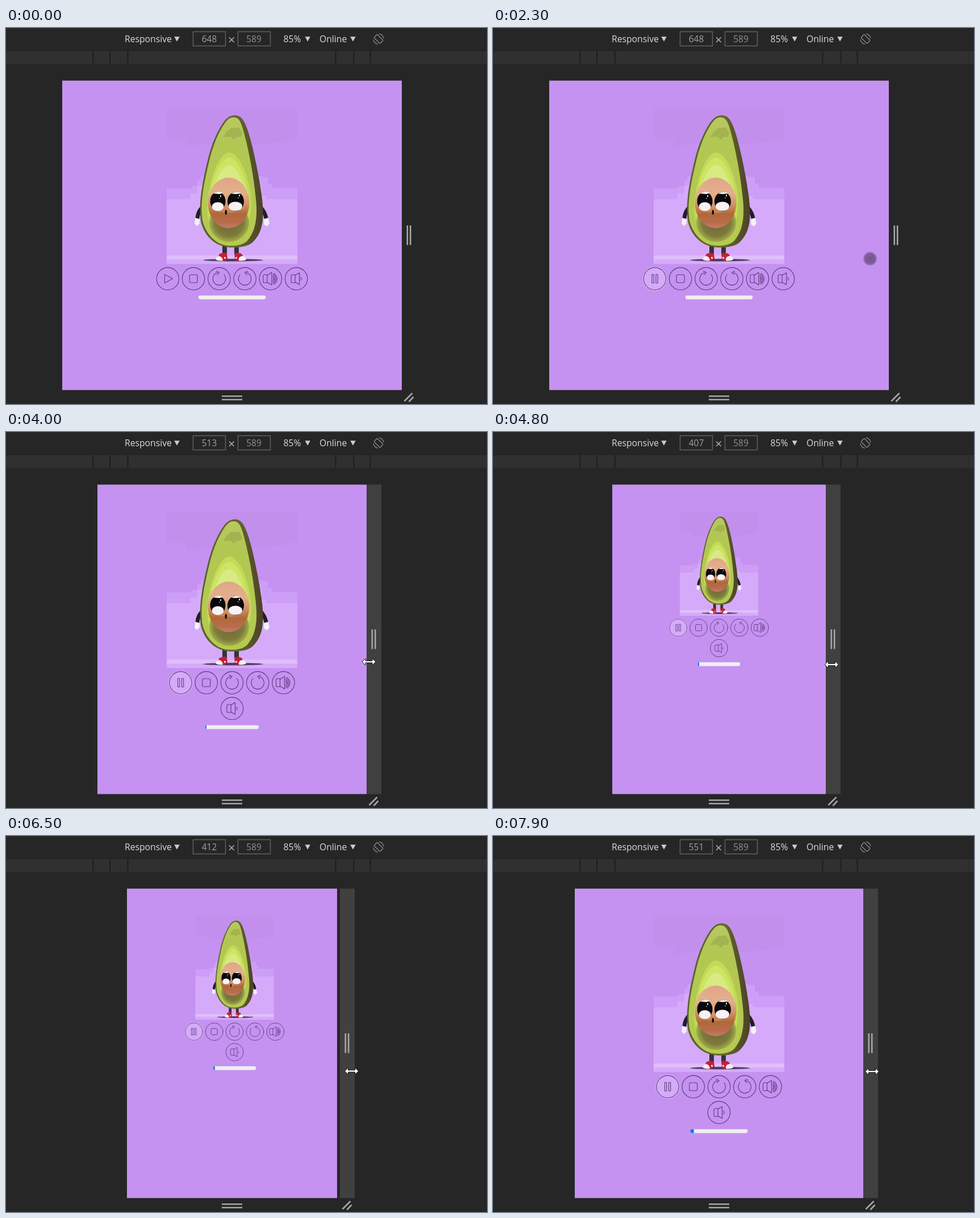
These frames come from a looping animation (847 by 661 pixels, 8 s). An HTML page:

```html
<!DOCTYPE html>
<html lang="en">
<head>
<meta charset="utf-8">
<title>Responsive player</title>
<style>
html, body { margin: 0; width: 100%; height: 100%; overflow: hidden; background: #262626; }
svg { display: block; width: 100vw; height: 100vh; }
text { font: 15.7px "Open Sans", "Noto Sans", sans-serif; fill: #dcdcdc; }
.field { fill: none; stroke: #606060; stroke-width: 1.5; }
.dim { fill: #a2a2a2; font-size: 15.4px; text-anchor: middle; }
.grip { stroke: #a6a6a6; stroke-width: 2.6; fill: none; }
.icon { fill: none; stroke: #5c3c7c; stroke-width: 1.1; stroke-linejoin: round; stroke-linecap: round; }
</style>
</head>
<body>
<svg viewBox="0 0 847 661" preserveAspectRatio="none">
  <defs>
    <linearGradient id="flesh" x1="0" y1="0" x2="0" y2="1">
      <stop offset="0" stop-color="#b9c862"/><stop offset=".2" stop-color="#b2c753"/>
      <stop offset="1" stop-color="#b4ca50"/>
    </linearGradient>
    <linearGradient id="shell" x1="0" y1="0" x2="1" y2="0">
      <stop offset="0" stop-color="#58602c"/><stop offset=".6" stop-color="#65652f"/>
      <stop offset="1" stop-color="#4b4226"/>
    </linearGradient>
    <linearGradient id="pit" x1="0" y1="0" x2="0" y2="1">
      <stop offset="0" stop-color="#e0a487"/><stop offset=".3" stop-color="#e4b190"/>
      <stop offset=".55" stop-color="#cf8f60"/><stop offset=".72" stop-color="#b0683a"/>
      <stop offset=".88" stop-color="#b96c4b"/><stop offset="1" stop-color="#c67a68"/>
    </linearGradient>
    <radialGradient id="shade">
      <stop offset="0" stop-color="#6c6636"/><stop offset=".72" stop-color="#7d7b3c"/>
      <stop offset="1" stop-color="#a3ad48"/>
    </radialGradient>
    <radialGradient id="touch">
      <stop offset="0" stop-color="#402f50" stop-opacity=".68"/>
      <stop offset=".75" stop-color="#483558" stop-opacity=".62"/>
      <stop offset="1" stop-color="#483558" stop-opacity=".12"/>
    </radialGradient>
  </defs>

  <rect width="847" height="661" fill="#262626"/>
  <rect y="39" width="847" height="1.5" fill="#222"/>
  <rect y="40.5" width="838" height="22.5" fill="#303030"/>
  <rect x="839" y="40.5" width="8" height="22.5" fill="#303030"/>
  <path d="M153.5 40V62M183 40V62M214.5 40V62M580.5 40V62M612.5 40V62M641.5 40V62" stroke="#1d1d1d" stroke-width="2"/>

  <text x="209" y="25.3">Responsive</text>
  <text x="488.5" y="25.3">85%</text>
  <text x="552" y="25.3">Online</text>
  <path d="M296.3 15.300h9.400l-4.700 8.400zM526.600 15.300h9.200l-4.600 8.400zM606.300 15.300h9.400l-4.700 8.400z" fill="#ccc"/>
  <rect class="field" x="329.5" y="6.5" width="57" height="25"/>
  <rect class="field" x="408.5" y="6.5" width="57" height="25"/>
  <text class="dim" id="size" x="358" y="25.3"></text>
  <text class="dim" x="436.5" y="25.3" style="fill:#919191">589</text>
  <path d="M393 16.500l8.500 8.500m0-8.500l-8.500 8.500" stroke="#bbb" stroke-width="1.4"/>
  <g transform="translate(656 19.3)" fill="none" stroke="#a4a4a4" stroke-width="1.1">
    <rect x="-4" y="-7.5" width="8" height="15" rx="1.5" transform="rotate(-45)"/>
    <path d="M1-9A9 9 0 0 1 9-1M-1 9A9 9 0 0 1-9 1"/>
  </g>

  <rect id="view" y="92.5" height="544" fill="#c592f1"/>
  <g id="video">
    <path d="M-115 1h230v55H98v5H64v4H-60v4h-20v-13h-35z" fill="#c18fea" opacity=".6"/>
    <path d="M-115 143h44v-4h10v-10h6v-7H54v1h9v12h7v7h45V276h-230z" fill="#cd9ef7"/>
    <path d="M-115 162h42v-10h12v-14H52v18h8v6h55V276h-230z" fill="#d6aafb"/>
    <rect x="-115" y="261" width="230" height="7" fill="#dfbefb"/>
    <g transform="translate(-398 -139)">
      <ellipse cx="400" cy="408" rx="53" ry="2.2" fill="#51395f"/>
      <path d="M385 383v15M406 383v15" stroke="#343338" stroke-width="8"/>
      <path d="M376 397q6-3 13-1l1 10-5 3-14-1zM402 396q7-2 13 1l6 11-16 1-2-4z" fill="#c31f37"/>
      <path d="M369 407q1-6 7-6 5 1 6 8-8 1-13-2zM423 407q-2-7-8-6-6 1-5 8 9 1 13-2z" fill="#f5eff5"/>
      <path d="M384 404h3m17 0h3" stroke="#fff" stroke-width="2.5"/>
      <path d="M344 317q-6 7-7 17M449 316q7 8 9 18" stroke="#211d28" stroke-width="7" fill="none" stroke-linecap="round"/>
      <path d="M333 334l8 2 0 8-5 4-4-4zM454 336l8-2 2 10-5 5-5-4z" fill="#f5f1f7" stroke="#d6cbdf" stroke-width=".8"/>
      <path d="M402 153.500C414 153 420 162 427 184C437 216 446 265 450 293C456 336 452 360 434 377C424 386 401 387 388 385C364 381 346.500 361 342.700 337C339 307 346 270 355 233C362 203 373.500 178 385 163C391 156 396 154 402 153.500Z" fill="url(#shell)"/>
      <path d="M400 157C410 156 414 165 419 184C430 224 437 270 440 301C444 339 437 360 425 374C416 383 398 384 386 382C366 378 349.500 358 345.500 336C341.500 306 349 270 358 233C365 204 375.500 180 387 165C392 159 396 157 400 157Z" fill="url(#flesh)"/>
      <path d="M388 183l8-7 14-1 6 9-2 7-9 1-4 5-5-6-13 1z" fill="#a0b04e" opacity=".85"/>
      <path d="M393 219C408 219 424 250 430 286C436 326 428 364 393 375C360 367 350 336 356 295C361 256 378 219 393 219Z" fill="#c2da57"/>
      <path d="M393 228C406 228 421 257 426 288L425 335H360V289C364 258 380 228 393 228Z" fill="#cde563"/>
      <path d="M393 241C404 241 415 261 420 288H366C370 261 382 241 393 241Z" fill="#d8ea82"/>
      <ellipse cx="393" cy="342" rx="35" ry="34" fill="url(#shade)"/>
      <ellipse cx="392" cy="307.5" rx="36.5" ry="44.5" fill="url(#pit)"/>
      <path d="M362 288q30-24 60 0l-5 31q-26 12-50 0z" fill="#e0a980" opacity=".3"/>
      <ellipse cx="373" cy="304.5" rx="13.5" ry="16.5" fill="#0a080b"/>
      <ellipse cx="404.5" cy="305" rx="14.5" ry="17" fill="#0a080b"/>
      <path d="M365 291q8-6 17-1l-6 2zM396 291q10-6 18 0l-10 1z" fill="#f7eeea"/>
      <ellipse cx="373" cy="314" rx="10.5" ry="7.7" fill="#f8f2f4"/>
      <ellipse cx="404" cy="313.5" rx="12" ry="8" fill="#f8f2f4"/>
      <path d="M378 294v3m-2 2v1M411 293v3m-2 2v1" stroke="#fff" stroke-width="1.7"/>
      <ellipse cx="387.3" cy="324" rx="1.8" ry="4.3" fill="#1d0d08"/>
    </g>
  </g>
  <g id="buttons"></g>
  <rect id="track" height="6.6" rx="3.3" fill="#efefef"/>
  <path id="done" fill="#0a75f8"/>

  <rect id="strip" y="92.5" width="26" height="544" fill="#404040"/>
  <g class="grip">
    <path d="M380 647.300h36M380 653.300h36"/>
    <path id="grips" d="M-2.700 347v34.500M2.700 347v34.500M-8 656l14-14M0 657l8-8.500"/>
  </g>

  <g id="cursor">
    <circle r="12.5" fill="url(#touch)"/>
    <path d="M-12 0l6-6v4.300H6V-6l6 6-6 6V1.700H-6V6z" fill="#fff" stroke="#111" stroke-width="1"/>
    <path d="M0 0v17l4-4 3 6 2.500-1-3-6H12z" fill="#fff" stroke="#111" stroke-width="1"/>
  </g>
</svg>
<script>
const LOOP = 8000, STEP = 100, ZOOM = .9225, MID = 398;
const $ = id => document.getElementById(id);
const set = (el, attrs) => { for (const k in attrs) el.setAttribute(k, attrs[k]); };
const move = (el, x, y, sx = 1, sy = sx) =>
  el.setAttribute('transform', `translate(${x} ${y}) scale(${sx} ${sy})`);
const show = (el, on) => { el.style.display = on ? '' : 'none'; };

// Keys are [time, value, ...]; returns the interpolated values.
function along(keys, t) {
  const i = keys.findIndex(k => k[0] > t);
  if (i < 0) return keys[keys.length - 1].slice(1);
  if (i === 0) return keys[0].slice(1);
  const a = keys[i - 1], b = keys[i], p = (t - a[0]) / (b[0] - a[0]);
  return a.slice(1).map((v, j) => v + (b[j + 1] - v) * p);
}

const widths = [[3000, 648], [3200, 630], [3600, 553], [3700, 553], [4000, 513], [4500, 430],
  [4600, 430], [5300, 349], [5700, 349], [5800, 366], [6200, 392], [6300, 392],
  [7000, 463], [7200, 506], [7900, 551]];

const pointer = [[0, 9, -18], [200, 110, 50], [300, 210, 130], [450, 360, 240], [600, 404, 330],
  [800, 310, 456], [900, 283, 446], [1100, 283, 446], [1400, 300.5, 460], [1500, 300.5, 460],
  [1900, 500, 440], [2400, 705, 397], [3000, 705, 397], [3200, 694.5, 397], [3700, 658, 402],
  [4000, 639, 404], [4500, 604, 408], [4600, 604, 408], [5300, 577, 411], [5500, 577, 411],
  [5700, 578, 411], [5800, 585.5, 411.5], [6200, 598, 413], [6300, 598, 413],
  [7000, 635, 414], [7200, 648, 414], [7900, 667.5, 414]];

const icons = [
  'M-5.500-7.500V7.500L8.500 0z',
  'M-4.500-7h9q2.500 0 2.500 2.500v9q0 2.500-2.500 2.500h-9q-2.500 0-2.500-2.500v-9q0-2.500 2.500-2.500z',
  'M-3-10.700A11.200 11.200 0 1 0 8.500-7.300M-5-13.500l5 2.500-3.500 4',
  'M3-10.700A11.200 11.200 0 1 1-8.500-7.300M5-13.500L0-11l3.500 4',
  'M-6-7h-5q-2 0-2 2V5q0 2 2 2h5zM-6-6L2-11V11L-6 6M4-3q3 3 0 6M4-6q6.500 6 0 12M4.500-8.500q10 8.500 0 17M6.500-9.500q10 9.500 0 19',
  'M-2-7h-5q-2 0-2 2V5q0 2 2 2h5zM-2-6L5.500-10.500V10.500L-2 6M7.500-2.500q3.500 2.500 0 5'
];
const pause = 'M-5-7.500h3.200v15H-5zM2-7.500h3.200v15H2z';

const buttons = icons.map(d => {
  const g = document.createElementNS('http://www.w3.org/2000/svg', 'g');
  g.setAttribute('class', 'icon');
  g.innerHTML = `<circle r="20.5" stroke="none"/><circle r="19.7"/><path d="${d}"/>`;
  $('buttons').append(g);
  return g;
});

function layout(w, left, percent) {
  const full = w * ZOOM, cx = left + full / 2, big = w > 500;
  const pitch = big ? 45.25 : 35.9, top = big ? 440.8 : 344;
  const perRow = Math.min(6, Math.floor(full * .52 / pitch));
  move($('video'), cx, 139, big ? 1 : .6, big ? 1 : .667);

  buttons.forEach((b, i) => {
    const row = Math.floor(i / perRow), n = Math.min(perRow, 6 - row * perRow);
    const x = cx + (i % perRow - (n - 1) / 2) * pitch;
    move(b, x, top + row * pitch, big ? 1 : .785);
  });

  const lastRow = Math.ceil(6 / perRow) - 1;
  const y = top + lastRow * pitch + (big ? 32.8 : 28.2);
  const bar = full * .1985, x = cx - bar / 2, d = bar * percent / 100, r = Math.min(3.3, d);
  set($('track'), { x, y: y - 3.3, width: bar });
  $('done').setAttribute('d', d
    ? `M${x + d} ${y - 3.3}H${x + r}A${r} 3.3 0 0 0 ${x + r} ${y + 3.3}H${x + d}Z` : '');
}

function drawPointer(t) {
  const [x, y] = along(pointer, t);
  const resize = x > 697 || t >= 2400;
  const arrow = !resize && (y < 93 || x < 99);
  const [touch, ew, tip] = $('cursor').children;
  show(touch, !resize && !arrow);
  show(ew, resize);
  show(tip, arrow);
  touch.setAttribute('opacity', t >= 1000 && t < 1200 ? 1 : .9);
  move($('cursor'), x, y);
}

function update(time) {
  const t = Math.floor(time % LOOP / STEP) * STEP;
  const w = Math.round(along(widths, t)[0]);
  // The page edge trails the drag handle while the window grows quickly.
  const late = t >= 6400 && t <= 7200 ? along(widths, t - STEP)[0] : w;
  const edge = MID - late * ZOOM / 2, right = Math.round(MID + w * ZOOM / 2);
  const x = Math.round(edge);
  const percent = t < 2700 ? 0 : 1 + Math.floor((t - 2700) / 966);

  $('size').textContent = w;
  set($('view'), { x, width: Math.round(edge + late * ZOOM) - x });
  $('strip').setAttribute('x', right);
  show($('strip'), t >= 2400);
  move($('grips'), right + 12.5, 0);

  const playing = t >= 1200, [ring, , glyph] = buttons[0].children;
  set(ring, { fill: playing ? '#d6aafb' : 'none', stroke: playing ? '#ead5fa' : 'none' });
  glyph.setAttribute('d', playing ? pause : icons[0]);

  layout(w, edge, percent);
  drawPointer(t);
}

const start = performance.now();
function tick() {
  update(performance.now() - start);
  requestAnimationFrame(tick);
}
tick();
</script>
</body>
</html>
```
